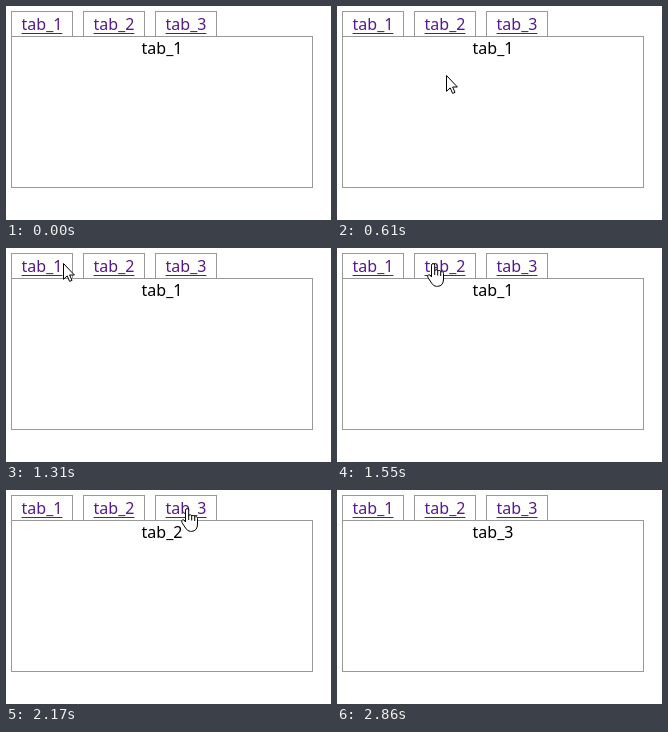
These frames come from a looping animation (325 px wide and 214 px high, 3180 ms). An HTML page:

```html
<!DOCTYPE html>
<html lang="en">
<head>
<meta charset="utf-8">
<title>Tabs</title>
<style>
  html, body { margin: 0; width: 100%; height: 100%; overflow: hidden; background: #fff; }
  body { position: relative; font: 16px "Noto Sans", "Open Sans", sans-serif; color: #000; }
  .tab, #panel { position: absolute; box-sizing: border-box; border: 1px solid #999; text-align: center; }
  .tab { top: 5px; width: 62px; height: 25px; border-bottom: 0; line-height: 24px; }
  .tab span {
    color: #551a8b;
    text-decoration: underline 1px;
    text-underline-offset: 3px;
    text-decoration-skip-ink: none;
  }
  .tab.active span { color: #f00; }
  #panel { left: 5px; top: 30px; width: 302px; height: 152px; line-height: 22px; }
  svg { position: absolute; left: 0; top: 0; width: 100%; height: 100%; overflow: hidden; }
  svg path { fill: #fff; stroke: #000; stroke-width: 1; stroke-linejoin: round; }
  svg .crease { fill: none; }
</style>
</head>
<body>
<div id="panel"></div>
<svg>
  <path id="arrow" d="M.5 .5V16.3L4.2 12.9L6.6 18.4L9 17.4L6.6 12H11.4Z"/>
  <g id="hand">
    <path d="M4.5 14V2.2a1.6 1.6 0 0 1 3.2 0V8a1.5 1.5 0 0 1 3 .5a1.5 1.5 0 0 1 3 1a1.5 1.5 0 0 1 2.8 1V16q0 7-6 7.4H9.5Q6.5 23.4 4.5 20L1 14.6Q0 12.5 1.5 11.8T4.5 14Z"/>
    <path class="crease" d="M7.7 8V12M10.7 8.5V12.5M13.7 9.5V13"/>
  </g>
</svg>
<script>
const LOOP = 3180;
const FIRST = 67, STEP = 77.5, STEPS = 36; // screen refreshes while the pointer is visible
const TABS = 3, TAB_X = 5, TAB_GAP = 72;

// pointer moves; it rests between them
const origin = { x: 272, y: 206 };
const moves = [
  { from: 67, to: 532, x: 144, y: 102 },
  { from: 532, to: 609, x: 109, y: 69 },
  { from: 609, to: 1074, x: 46, y: 15, ease: k => 1 - (1 - k) ** 2 },
  { from: 1240, to: 1540, x: 96, y: 15 },
  { from: 1850, to: 2159, x: 181, y: 18 },
  { from: 2159, to: 2314, x: 187, y: 21 },
  { from: 2550, to: 2780, x: 295, y: 210 }
];

// press times, one per tab
const presses = [1070, 1770, 2465];
const HOLD = 78;

const panel = document.getElementById("panel");
const arrow = document.getElementById("arrow");
const hand = document.getElementById("hand");
const name = i => "tab_" + (i + 1);

const tabs = Array.from({ length: TABS }, (_, i) => {
  const tab = document.createElement("div");
  tab.className = "tab";
  tab.style.left = TAB_X + i * TAB_GAP + "px";
  tab.innerHTML = `<span>${name(i)}</span>`;
  document.body.insertBefore(tab, panel);
  return tab;
});

function pointerAt(t) {
  let { x, y } = origin;
  for (const m of moves) {
    const k = Math.min(1, Math.max(0, (t - m.from) / (m.to - m.from)));
    const e = m.ease ? m.ease(k) : k;
    x += (m.x - x) * e;
    y += (m.y - y) * e;
  }
  return [Math.round(x), Math.round(y)];
}

function overLink(x, y) {
  const dx = x - TAB_X - 10;
  return y >= 8 && y < 29 && dx >= 0 && dx < TABS * TAB_GAP && dx % TAB_GAP < 42;
}

function place(el, visible, x, y) {
  el.style.display = visible ? "" : "none";
  el.setAttribute("transform", `translate(${x} ${y})`);
}

function draw(time) {
  const n = Math.floor((time - FIRST) / STEP);
  const t = FIRST + n * STEP;
  const [x, y] = pointerAt(t);
  const shown = n >= 0 && n < STEPS;
  const link = overLink(x, y);
  place(arrow, shown && !link, x, y);
  place(hand, shown && link, x - 6, y);

  let current = 0;
  presses.forEach((down, i) => {
    const up = down + HOLD;
    tabs[i].classList.toggle("active", t >= down && t < up);
    if (t >= up) current = i;
  });
  panel.textContent = name(current);
}

const start = performance.now();
function loop() {
  draw((performance.now() - start) % LOOP);
  requestAnimationFrame(loop);
}
loop();
</script>
</body>
</html>
```
